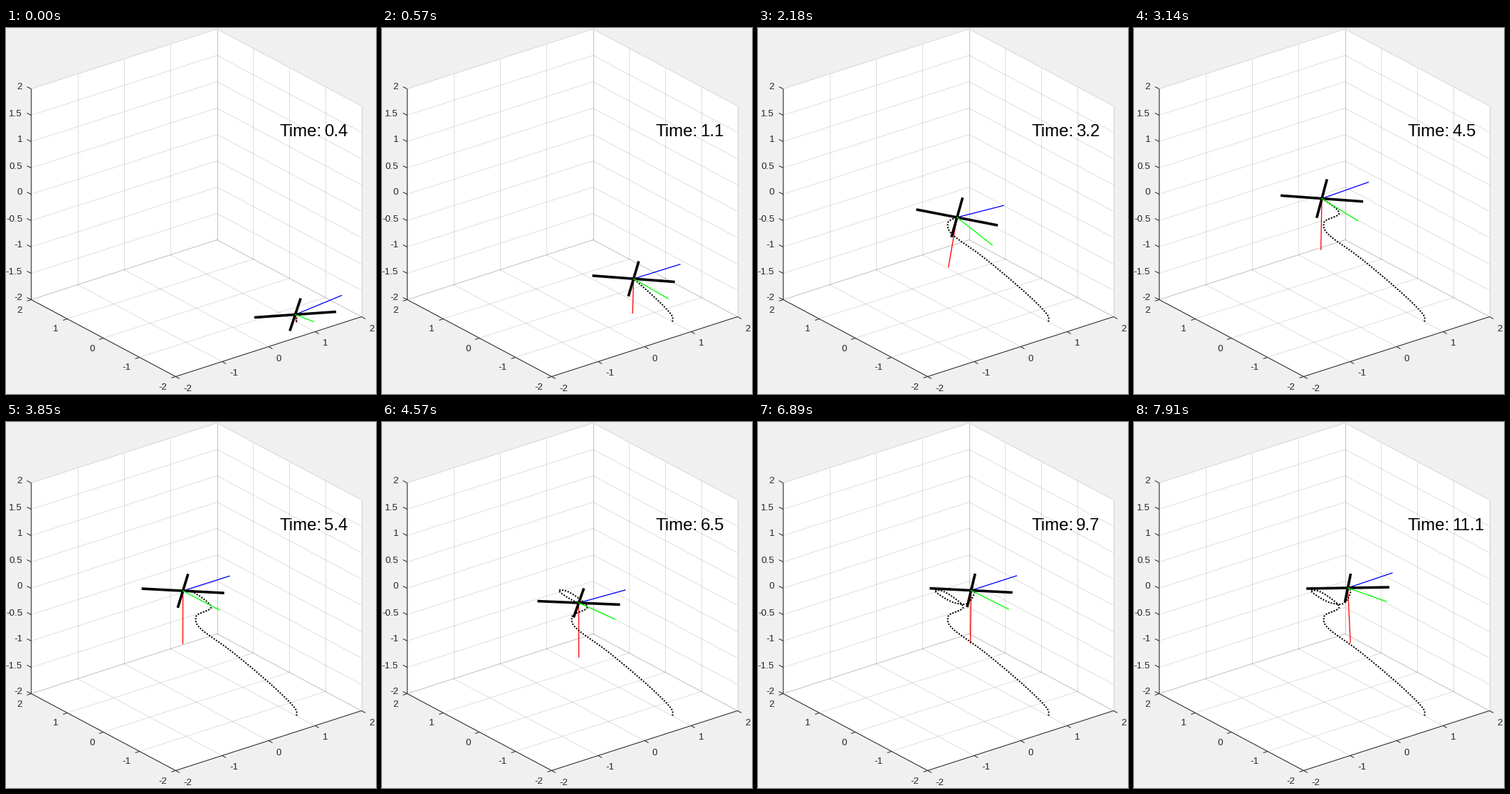
These frames come from a looping animation (520 px wide and 514 px high, 8000 ms). A matplotlib script:

```python
import numpy as np
import matplotlib.pyplot as plt
from matplotlib.animation import FuncAnimation
from matplotlib.collections import LineCollection

W, H, DPI = 520, 514, 100
LOOP, TICK = 8000, 20
INK = "#262626"
PT = 72 / DPI  # points per pixel

plt.rcParams["font.family"] = "Liberation Sans"

# Orthographic view: pixel position of the origin and of each unit axis
ORIGIN = np.array([268.0, 245.0])
AXES = np.array([[65.3, -21.0], [-50.75, -27.0], [0.0, -74.0]])

# Flight waypoints: time, screen x, screen y
PATH = [
    (0, 409, 412), (0.4, 407, 402), (1.5, 316, 320.5), (2.0, 276, 291.5),
    (2.6, 267, 275), (3.7, 288.5, 258), (4.5, 264.5, 239), (5.3, 249, 236),
    (6.5, 277, 253.5), (7.0, 291, 255.5), (8.1, 305, 238), (9.0, 300.5, 231),
    (9.7, 300, 236), (11.1, 301, 232.5),
]
# Lean of the craft: time, thrust along x, thrust along y
LEAN = [
    (0.4, -0.08, 0.11), (2.0, 0.10, -0.17), (4.5, -0.026, -0.06),
    (6.5, 0.04, 0.054), (8.1, -0.04, -0.02), (9.7, 0.016, 0), (11.1, 0.015, 0.09),
]
# Playback pace: clock in ms at which a step is reached
CLOCK, STEPS = [0, 60, 3140, 4570, 5840, 6710, 7910], [0, 1, 41, 61, 78, 91, 107]


def project(p):
    return ORIGIN + np.asarray(p, float) @ AXES


def smooth(keys, t):
    """Smooth curve through rows of (time, values...)."""
    keys = np.asarray(keys, float)
    k, v = keys[:, 0], keys[:, 1:]
    slope = np.gradient(v, k, axis=0)
    t = np.clip(np.atleast_1d(t), k[0], k[-1])
    i = np.clip(np.searchsorted(k, t, side="right") - 1, 0, len(k) - 2)
    h = (k[i + 1] - k[i])[:, None]
    s = (t - k[i])[:, None] / h
    return ((1 + 2 * s) * (1 - s) ** 2 * v[i] + s * (1 - s) ** 2 * h * slope[i]
            + s * s * (3 - 2 * s) * v[i + 1] + s * s * (s - 1) * h * slope[i + 1])


def flight_time(ms):
    return (4 + int(np.interp(ms, CLOCK, STEPS) + 1e-6)) / 10


def body_axes(t):
    """Screen vectors of the forward, side and down axes of the craft."""
    tx, ty = smooth(LEAN, t)[0]
    yaw = max(0, 0.02 * (t - 8.3))
    up = np.array([tx, ty, np.sqrt(1 - tx * tx - ty * ty)])
    side = np.array([np.sin(yaw), -np.cos(yaw), 0])
    side -= up * (side @ up)
    side /= np.linalg.norm(side)
    return np.cross(up, side) @ AXES, side @ AXES, -up @ AXES


fig = plt.figure(figsize=(W / DPI, H / DPI), dpi=DPI, facecolor="#f0f0f0")
ax = fig.add_axes([0, 0, 1, 1])
ax.set(xlim=(0.5, W + 0.5), ylim=(H - 0.5, -0.5))
ax.axis("off")


def label(value, x, y, side):
    ax.text(x, y, f"{value:g}", size=13.33 * PT, color=INK, ha=side,
            va="center_baseline")


def draw_box():
    outline = [(-2, -2, -2), (2, -2, -2), (2, -2, 2), (2, 2, 2), (-2, 2, 2), (-2, 2, -2)]
    ax.fill(*project(outline).T, color="white", lw=0, zorder=0)

    grid, ticks = [], []
    for v in range(-2, 3):
        grid += [[(v, -2, -2), (v, 2, -2)], [(v, 2, -2), (v, 2, 2)],
                 [(-2, v, -2), (2, v, -2)], [(2, v, -2), (2, v, 2)]]
        p, q = project((v, -2, -2)), project((-2, v, -2))
        ticks += [[p, p + (5.5, 3)], [q, q + (-6, 2)]]
        label(v, p[0] + 11, p[1] + 15.5, "left")
        label(v, q[0] - 12.5, q[1] + 13.5, "right")
    for z in np.arange(-2, 2.1, 0.5):
        grid += [[(-2, 2, z), (2, 2, z)], [(2, -2, z), (2, 2, z)]]
        p = project((-2, 2, z))
        ticks.append([p, p + (-6, -3)])
        label(z, p[0] - 12.4, p[1] - 3.5, "right")

    ax.add_collection(LineCollection([project(g) for g in grid], colors=INK,
                                     alpha=0.15, linewidths=PT, zorder=1))
    edge = project([(2, -2, -2), (-2, -2, -2), (-2, 2, -2), (-2, 2, 2)])
    ax.add_collection(LineCollection([edge] + ticks, colors=INK,
                                     linewidths=PT, zorder=2))


def line(color, width, z, **kw):
    return ax.plot([], [], color=color, lw=width * PT, zorder=z, **kw)[0]


def title(x, text):
    return ax.text(x, 151, text, size=24 * PT, color="black", va="baseline")


def segment(artist, a, b):
    artist.set_data([a[0], b[0]], [a[1], b[1]])


draw_box()
red = line("#ff0000", 1.3, 3)
blue = line("#0000ff", 1.3, 4)
trail = line("black", 2, 5, ls=(0, (1, 1)), dash_capstyle="butt")
arms = [line("black", 3.6, 6, solid_capstyle="butt") for _ in range(2)]
green = line("#00ff00", 1.3, 7)
title(384.8, "Time:")
counter = title(447.8, "")


def draw(n):
    t = flight_time((n + 0.5) * TICK)
    c = smooth(PATH, t)[0]
    b, g, r = body_axes(t)
    trail.set_data(*smooth(PATH, np.linspace(0, t, int(t * 30) + 2)).T)
    # parts outside the box are cut off early in the flight
    segment(green, c, c + g * min(1, 0.47 + 0.4 * t ** 2.2))
    segment(red, c, c + r * min(1, 0.57 * t ** 1.52))
    segment(blue, c, c + b)
    for arm, half in zip(arms, ((b + g) / 2, (b - g) / 2)):
        segment(arm, c - half, c + half)
    counter.set_text(f"{t:.1f}")
    return red, blue, trail, *arms, green, counter


anim = FuncAnimation(fig, draw, frames=LOOP // TICK, interval=TICK,
                     repeat=True, repeat_delay=0, blit=False)
plt.show()
```
